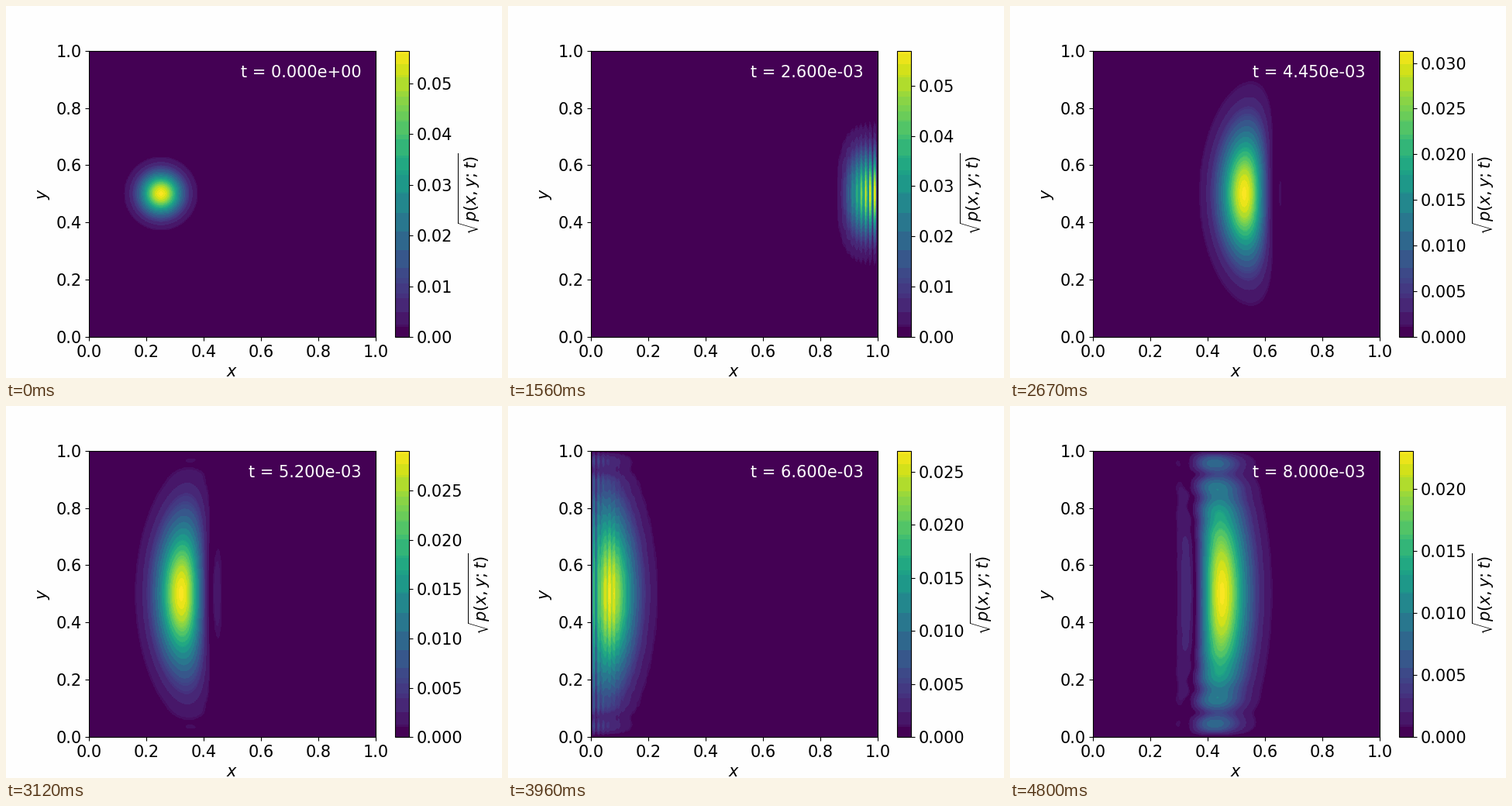
A matplotlib script for the animation above (4.83 s loop, 640x480 px).

```python
import numpy as np
import matplotlib.pyplot as plt
from matplotlib.animation import FuncAnimation
from matplotlib.colors import ListedColormap

# Free wave packet in a box, Crank-Nicolson stepping done in the sine basis
CELLS = 200
H = 1 / CELLS
DT = 2.5e-5
STEPS_PER_FRAME = 2
FRAMES = 161
SIZE = 15
PAPER = "#fefefe"


def banded_viridis():
    """Viridis averaged inside coarse RGB cells, which gives flat bands."""
    rgb = plt.get_cmap("viridis")(np.arange(256), bytes=True)[:, :3].astype(int)
    key = rgb[:, 0] // 32 * 256 + rgb[:, 1] // 16 * 16 + rgb[:, 2] // 32
    bands = np.empty((256, 3))
    for k in set(key.tolist()):
        bands[key == k] = rgb[key == k].mean(axis=0) // 1
    bands[key == key[0]] = rgb[0]  # the empty box keeps the pure base colour
    return ListedColormap(bands / 255)


def start_packet(x, xc=0.25, yc=0.5, sigma=0.05, px=200):
    along_x = np.exp(-(x - xc) ** 2 / (2 * sigma**2) + 1j * px * x)
    along_y = np.exp(-(x - yc) ** 2 / (2 * sigma**2))
    u = np.outer(along_y, along_x)
    return u / np.sqrt(np.sum(np.abs(u) ** 2))


modes = np.arange(1, CELLS)
sines = np.sqrt(2 / CELLS) * np.sin(np.pi * np.outer(modes, modes) / CELLS)
sines = sines.astype(complex)
energy = 4 / H**2 * np.sin(np.pi * modes * H / 2) ** 2
phase = -2 * np.arctan((energy[:, None] + energy[None, :]) * DT / 2)
weights = sines @ start_packet(modes * H) @ sines


def amplitude(step):
    u = sines @ (weights * np.exp(1j * step * phase)) @ sines
    return np.pad(np.abs(u), 1)


fig = plt.figure(figsize=(6.4, 4.8), dpi=100, facecolor=PAPER)
ax = fig.gca()
first = amplitude(0)
img = ax.imshow(first, extent=[0, 1, 0, 1], cmap=banded_viridis(),
                vmin=0, vmax=first.max(), origin="lower")
ax.set_xlabel("$x$", fontsize=SIZE)
ax.set_ylabel("$y$", fontsize=SIZE)
ax.tick_params(labelsize=SIZE)
bar = fig.colorbar(img, ax=ax)
bar.set_label(r"$\sqrt{p(x, y; t)}$", fontsize=SIZE)
bar.ax.tick_params(labelsize=SIZE)
clock = ax.text(0.95, 0.95, "", color=PAPER, ha="right", va="top", fontsize=SIZE)


def update(i):
    step = i * STEPS_PER_FRAME
    field = amplitude(step)
    img.set_data(field)
    img.set_clim(0, field.max())
    clock.set_text(f"t = {step * DT:.3e}")
    return img, clock


anim = FuncAnimation(fig, update, frames=FRAMES, interval=30, repeat=True,
                     repeat_delay=0, cache_frame_data=False)
plt.show()
```
